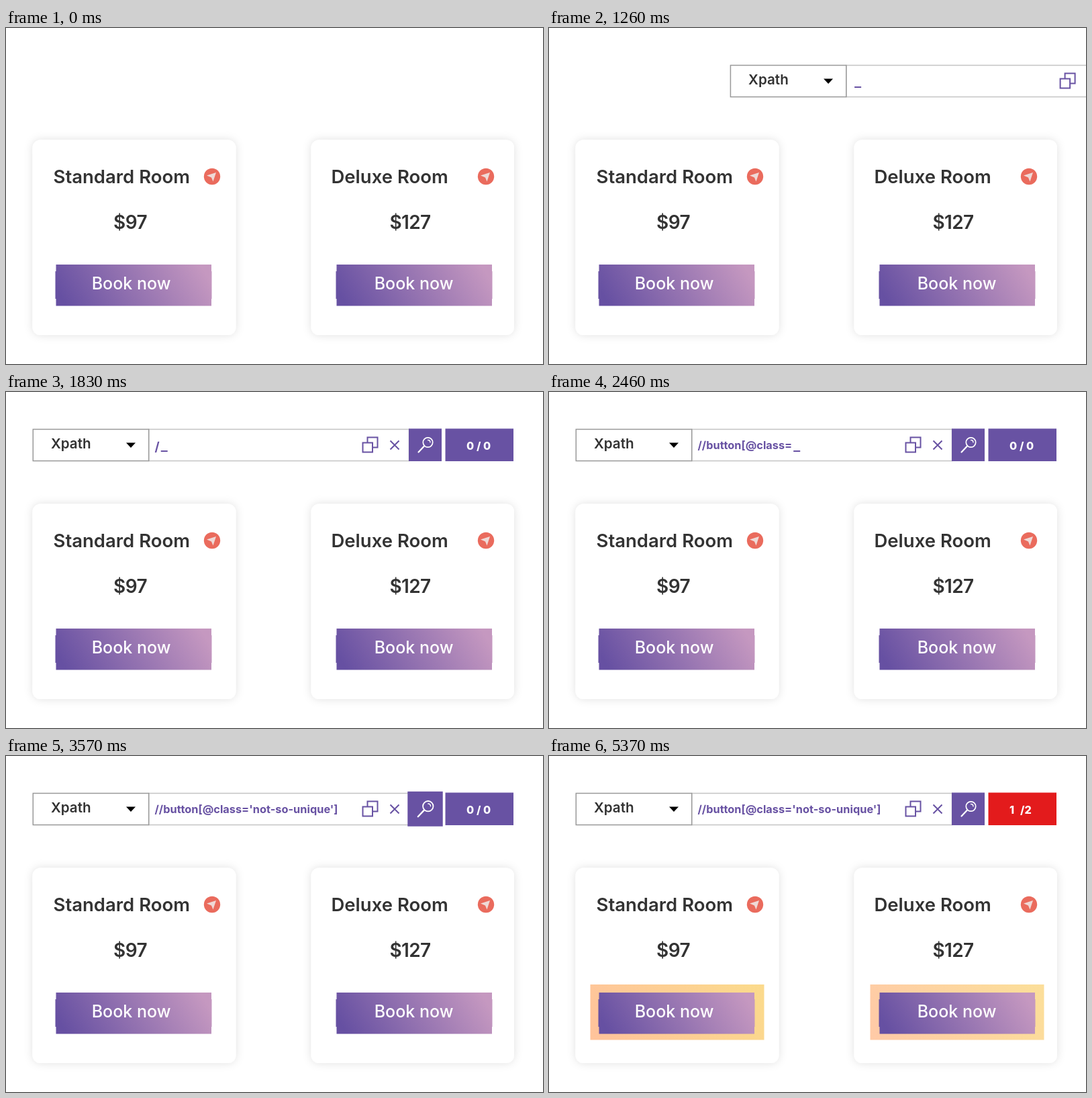
These frames come from a looping animation (800 px wide and 500 px high, 5.4 s). An HTML page:

```html
<!DOCTYPE html>
<html lang="en">
<head>
<meta charset="utf-8">
<title>XPath room search</title>
<style>
  html, body { margin: 0; width: 100%; height: 100%; overflow: hidden; background: #fff; }
  svg { display: block; width: 100vw; height: 100vh; font-family: Inter, "Open Sans", sans-serif; }
  .title { font-size: 27.5px; font-weight: 600; fill: #333; }
  .price { font-size: 28px; font-weight: 600; fill: #333; letter-spacing: -.6px; text-anchor: middle; }
  .book { font-size: 25px; font-weight: 500; fill: #fff; text-anchor: middle; }
  .kind { font-size: 20.6px; font-weight: 600; fill: #333; }
  .query { font-weight: 700; fill: #6852a3; }
  .count { font-size: 16.2px; font-weight: 800; fill: #fff; }
  .icon { fill: none; stroke: #6852a3; stroke-width: 2; }
</style>
</head>
<body>
<svg viewBox="0 0 800 500">
  <defs>
    <linearGradient id="violet" gradientUnits="userSpaceOnUse" x1="30" y1="84" x2="202" y2="-22">
      <stop offset="0" stop-color="#6650a2"/>
      <stop offset="1" stop-color="#c598c0"/>
    </linearGradient>
    <linearGradient id="amber" x1="0" y1=".6" x2="1" y2=".4">
      <stop offset="0" stop-color="#ffc094"/>
      <stop offset="1" stop-color="#fbd785"/>
    </linearGradient>
    <filter id="shadow" x="-10%" y="-10%" width="120%" height="120%">
      <feDropShadow dx="0" dy="0" stdDeviation="6.5" flood-color="#000" flood-opacity=".12"/>
    </filter>
  </defs>

  <g id="cards"></g>

  <g id="bar">
    <rect x="212.5" y="55.5" width="388" height="47" fill="#fff" stroke="#c4c4c4" stroke-width="1.5"/>
    <rect x="40.3" y="55.5" width="172.4" height="47" fill="#fff" stroke="#999" stroke-width="1.5"/>
    <text class="kind" x="67" y="84">Xpath</text>
    <path d="M179 75.5h14l-7 7.5z"/>
    <text id="query" class="query" x="221.5"></text>
    <rect id="cursor" y="87" width="10" height="2" fill="#6852a3"/>
    <path class="icon" d="M531.5 75.5h14.5v14h-14.5zM538.5 75v-7.5h15v15h-7"/>
    <path class="icon" d="M572.5 72.5l13 13m0-13l-13 13"/>
    <g id="search">
      <rect x="600" y="54.5" width="49" height="48.5" fill="#6852a3"/>
      <g fill="none" stroke="#fff" stroke-linecap="round">
        <circle cx="628.5" cy="75" r="7.2" stroke-width="1.7"/>
        <path d="M623 80.5l-8.5 9" stroke-width="2.2"/>
        <path d="M628.5 71.5a3.6 3.6 0 0 1 3.5 3.5" stroke-width="1.3"/>
      </g>
    </g>
    <rect id="counter" x="654.5" y="54.5" width="101.5" height="48.5"/>
    <text class="count" id="found" x="686" y="85.5"></text>
    <text class="count" id="total" y="85.5"></text>
  </g>
</svg>

<script>
const LOOP = 5400, STEP = 30;
const QUERY = "//button[@class='not-so-unique']";
const TYPE_START = 1830, TYPE_END = 3150, CHAR_MS = 41.6;
const SLIDE_END = 1602;

const $ = id => document.getElementById(id);
const clamp = v => Math.min(1, Math.max(0, v));
const progress = (t, from, to) => clamp((t - from) / (to - from));
const smooth = p => p * p * (3 - 2 * p);
const mix = (a, b, p) => a + (b - a) * p;

function card({ x, width, title, titleX, price, priceX, pinX, buttonX, bookX, glowX }) {
  return `
    <rect x="${x}" y="166.5" width="${width}" height="290.5" rx="12" fill="#fff" filter="url(#shadow)"/>
    <text class="title" x="${titleX}" y="231">${title}</text>
    <g transform="translate(${pinX} 221)">
      <circle r="12.2" fill="#ea6b5d"/>
      <path d="M-8-1.5L6-6 1.5 7.5-1 1.5z" fill="#efd9d6"/>
    </g>
    <text class="price" x="${priceX}" y="298.5">${price}</text>
    <rect class="glow" x="${glowX}" y="340" width="259" height="82.5" fill="url(#amber)"/>
    <g transform="translate(${buttonX} 352)" fill="url(#violet)">
      <rect x=".5" width="231.5" height="61.5"/>
      <rect x="-.5" y="10" width="233" height="41"/>
    </g>
    <text class="book" x="${bookX}" y="388.5">Book now</text>`;
}

$("cards").innerHTML = [
  { x: 39.5, width: 303, title: "Standard Room", titleX: 70.5, price: "$97", priceX: 185,
    pinX: 307, buttonX: 74, bookX: 186.5, glowX: 61.5 },
  { x: 454.5, width: 302.5, title: "Deluxe Room", titleX: 484.5, price: "$127", priceX: 602,
    pinX: 715, buttonX: 492, bookX: 607.5, glowX: 478.5 },
].map(card).join("");

const glows = document.querySelectorAll(".glow");

function searchScale(t) {
  if (t < 3500) return mix(1, 0.92, smooth(progress(t, 3360, 3500)));
  if (t < 3640) return mix(0.92, 1.22, smooth(progress(t, 3500, 3640)));
  return mix(1.22, 1, smooth(progress(t, 3640, 3780)));
}

function draw(t) {
  const bar = $("bar");
  bar.style.display = t < 1050 ? "none" : "";
  const left = 1 - progress(t, 1050, SLIDE_END);
  bar.setAttribute("transform", `translate(${726 * left ** 2.4} 0)`);

  const query = $("query");
  const typed = t < TYPE_START ? 0
    : t < TYPE_END ? Math.min(31, 1 + Math.floor((t - TYPE_START) / CHAR_MS))
    : QUERY.length;
  const shrink = progress(t, TYPE_START, 2100);
  query.style.fontSize = mix(18.6, 16.35, shrink) + "px";
  query.setAttribute("y", mix(87.5, 85, shrink));
  query.textContent = QUERY.slice(0, typed);

  const cursor = $("cursor");
  cursor.style.display = t < TYPE_END ? "" : "none";
  cursor.setAttribute("x", typed ? 223.5 + query.getComputedTextLength() : 225);

  const s = searchScale(t);
  $("search").setAttribute("transform",
    `translate(624.5 78.75) scale(${s}) translate(-624.5 -78.75)`);

  const matched = t >= 3720;
  $("counter").setAttribute("fill", matched ? "#e31b1c" : "#6852a3");
  $("found").textContent = matched ? "1" : "0";
  $("total").textContent = matched ? "/2" : "/ 0";
  $("total").setAttribute("x", matched ? 702 : 701);

  const shown = smooth(progress(t, 3700, 4060));
  const fade = smooth(progress(t, 4200, 5370));
  glows[0].setAttribute("opacity", shown * mix(1, 0.94, fade));
  glows[1].setAttribute("opacity", shown * mix(0.9, 0.83, fade));
}

const start = performance.now();
function tick() {
  const t = (performance.now() - start) % LOOP;
  draw(Math.floor(t / STEP) * STEP);
  requestAnimationFrame(tick);
}
tick();
</script>
</body>
</html>
```
